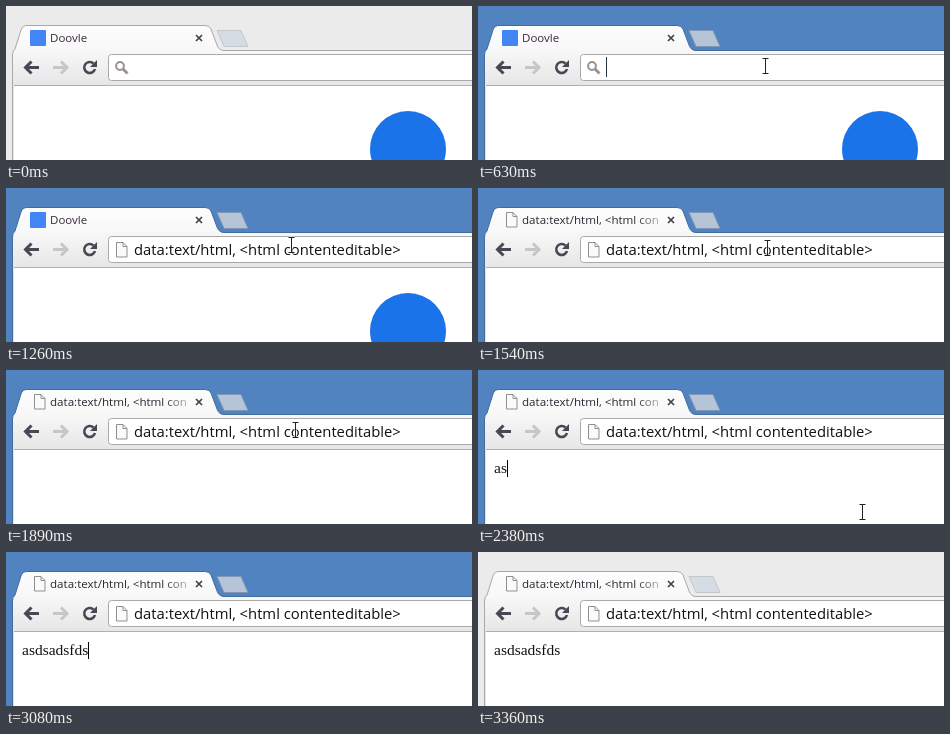
An HTML page that plays this animation: 466 px wide and 154 px high, repeating every 3.43 s.

```html
<!DOCTYPE html>
<html lang="en">
<head>
<meta charset="utf-8">
<title>Editable page</title>
<style>
  html, body { margin: 0; width: 100%; height: 100%; overflow: hidden; }
  svg { display: block; width: 466px; height: 154px; }
  text { white-space: pre; font-family: "Open Sans", "Noto Sans", sans-serif; }
  #typed { font: 15.5px "Liberation Serif", serif; }
</style>
</head>
<body>
<svg viewBox="0 0 466 154">
  <defs>
    <linearGradient id="bar" x1="0" y1="19" x2="0" y2="80" gradientUnits="userSpaceOnUse">
      <stop offset="0" stop-color="#fdfdfd"/>
      <stop offset=".4" stop-color="#f8f8f8"/>
      <stop offset="1" stop-color="#e6e6e6"/>
    </linearGradient>
    <linearGradient id="fade" x1="158" x2="184" y1="0" y2="0" gradientUnits="userSpaceOnUse">
      <stop offset="0" stop-color="#2c2632"/>
      <stop offset="1" stop-color="#2c2632" stop-opacity=".25"/>
    </linearGradient>
    <clipPath id="tabClip"><rect x="40" y="20" width="142" height="22"/></clipPath>
  </defs>

  <rect id="frame" width="466" height="154"/>
  <path id="newTab" stroke-linejoin="round" d="M 211 24.5 H 235 L 242 40.5 H 218 Z"/>
  <path id="window" fill="url(#bar)" d="M 6.5 156 V 49 Q 6.5 45 9 43 L 15 24 Q 16.5 19.5 21 19.5
    H 199 Q 203.5 19.5 205 23 L 211 39 Q 213 44.5 218 44.5 H 470 V 156 Z"/>
  <path d="M 8 79.5 H 466" stroke="#b0b0b0"/>
  <rect x="8" y="80" width="458" height="74" fill="#fff"/>
  <circle id="logo" cx="402" cy="143" r="38" fill="#1a73e8"/>

  <g id="homeTab">
    <rect x="24" y="24" width="16" height="16" rx="1" fill="#4285f4"/>
    <text x="44" y="36" font-size="11.5" fill="#3a2a3c">Doovle</text>
  </g>
  <g id="dataTab">
    <use href="#sheet" x="-82" y="-30"/>
    <text id="tabTitle" x="44" y="36" font-size="11.6" fill="url(#fade)" clip-path="url(#tabClip)"></text>
  </g>
  <path d="M 190 29 l 6 6 m 0 -6 l -6 6" stroke="#454045" stroke-width="1.7"/>

  <g fill="none" stroke="#4b4654" stroke-width="3">
    <path d="M 33 61.5 H 20 M 25.5 55.5 l -6 6 l 6 6"/>
    <path d="M 47 61.5 H 60 M 55 55.5 l 6 6 l -6 6" stroke="#c6c6c8"/>
    <path d="M 87.5 57.5 A 5.5 5.5 0 1 0 89 63" stroke-width="2.6"/>
  </g>
  <path d="M 91 54 V 61 H 84 Z" fill="#4b4654"/>

  <rect x="102.5" y="48.5" width="380" height="26" rx="3" fill="#fff" stroke="#a9a9a9"/>
  <g id="lens" fill="none" stroke="#9a9096">
    <circle cx="114" cy="60" r="3.9" stroke-width="2"/>
    <path d="M 117 63 l 4.5 4.5" stroke-width="2.8"/>
  </g>
  <g id="address">
    <path id="sheet" fill="#fafafa" stroke="#8f8f8f"
      d="M 110.5 54.5 h 6.5 l 4 4 v 10.5 h -10.5 z m 6.5 0 v 4 h 4"/>
    <text id="url" x="128" y="67" font-size="14.8" fill="#111"></text>
  </g>
  <rect id="urlCaret" y="51" width="1" height="20" fill="#26344a"/>

  <text id="typed" x="16" y="103" fill="#111"></text>
  <rect id="pageCaret" y="90" width="1" height="17" fill="#000"/>

  <path id="arrow" fill="#fff" stroke="#222"
    d="M .5 .5 V 15.5 L 4 12.5 L 6.5 18 L 9 17 L 6.5 11.5 H 11 Z"/>
  <g id="beam">
    <path d="M -3 -7.5 H 3 M 0 -7 V 7 M -3 7.5 H 3" stroke="#fff" stroke-opacity=".7" stroke-width="2.5"/>
    <path d="M -3 -7.5 H 3 M 0 -7 V 7 M -3 7.5 H 3" stroke="#222"/>
  </g>
</svg>
<script>
const LOOP = 3430, STEP = 70;
const $ = id => document.getElementById(id);
const show = (id, on) => $(id).style.display = on ? "" : "none";
const paint = (id, fill, stroke) => {
  $(id).style.fill = fill;
  $(id).style.stroke = stroke;
};
const within = (t, from, to) => t >= from && t < to;
// Latest entry whose start time has passed
const latest = (list, t) => list.filter(k => k[0] <= t).pop();

const scheme = "data", rest = "text/html, <html contenteditable>";
const url = scheme + ":" + rest;
$("url").textContent = url;
$("tabTitle").textContent = url.slice(0, 25);

const pointer = [
  [0, ""], [280, "arrow", 297, 104], [350, "arrow", 291, 79],
  [560, "beam", 287.5, 60], [1260, "beam", 285.5, 57],
  [1400, "beam", 288.5, 59], [1540, "beam", 289.5, 60],
  [1960, "beam", 313.5, 80], [2030, "beam", 352.5, 116],
  [2100, "beam", 384.5, 142], [2660, ""]
];
const word = "asdsadsfds";
const typing = [
  [0, 0], [2380, 2], [2520, 3], [2660, 4], [2730, 5],
  [2870, 6], [2940, 7], [3010, 8], [3080, 10]
];

function draw(time) {
  const t = Math.floor(time % LOOP / STEP) * STEP;
  const active = within(t, 560, 3360);
  const pasted = t >= 840, loaded = t >= 1400;

  $("frame").style.fill = active ? "#5083bf" : "#ebebeb";
  if (active) {
    paint("newTab", "#b5c4d6", "#8097b5");
    $("window").style.stroke = "#426b9e";
  } else {
    paint("newTab", "#d5dce4", "#c3c8cf");
    $("window").style.stroke = "#a8a8a8";
  }

  show("logo", !loaded);
  show("homeTab", !loaded);
  show("dataTab", loaded);
  show("lens", !pasted);
  show("address", pasted);

  show("urlCaret", within(t, 630, 1120));
  $("urlCaret").setAttribute("x", pasted ? 396 : 128);

  const typed = $("typed");
  typed.textContent = word.slice(0, latest(typing, t)[1]);
  show("pageCaret", within(t, 2100, 3360));
  $("pageCaret").setAttribute("x", Math.round(16 + typed.getComputedTextLength()));

  const [, shape, x, y] = latest(pointer, t);
  for (const id of ["arrow", "beam"]) show(id, id === shape);
  if (shape) $(shape).setAttribute("transform", `translate(${x} ${y})`);
}

const start = performance.now();
function tick() {
  draw(performance.now() - start);
  requestAnimationFrame(tick);
}
tick();
</script>
</body>
</html>
```
